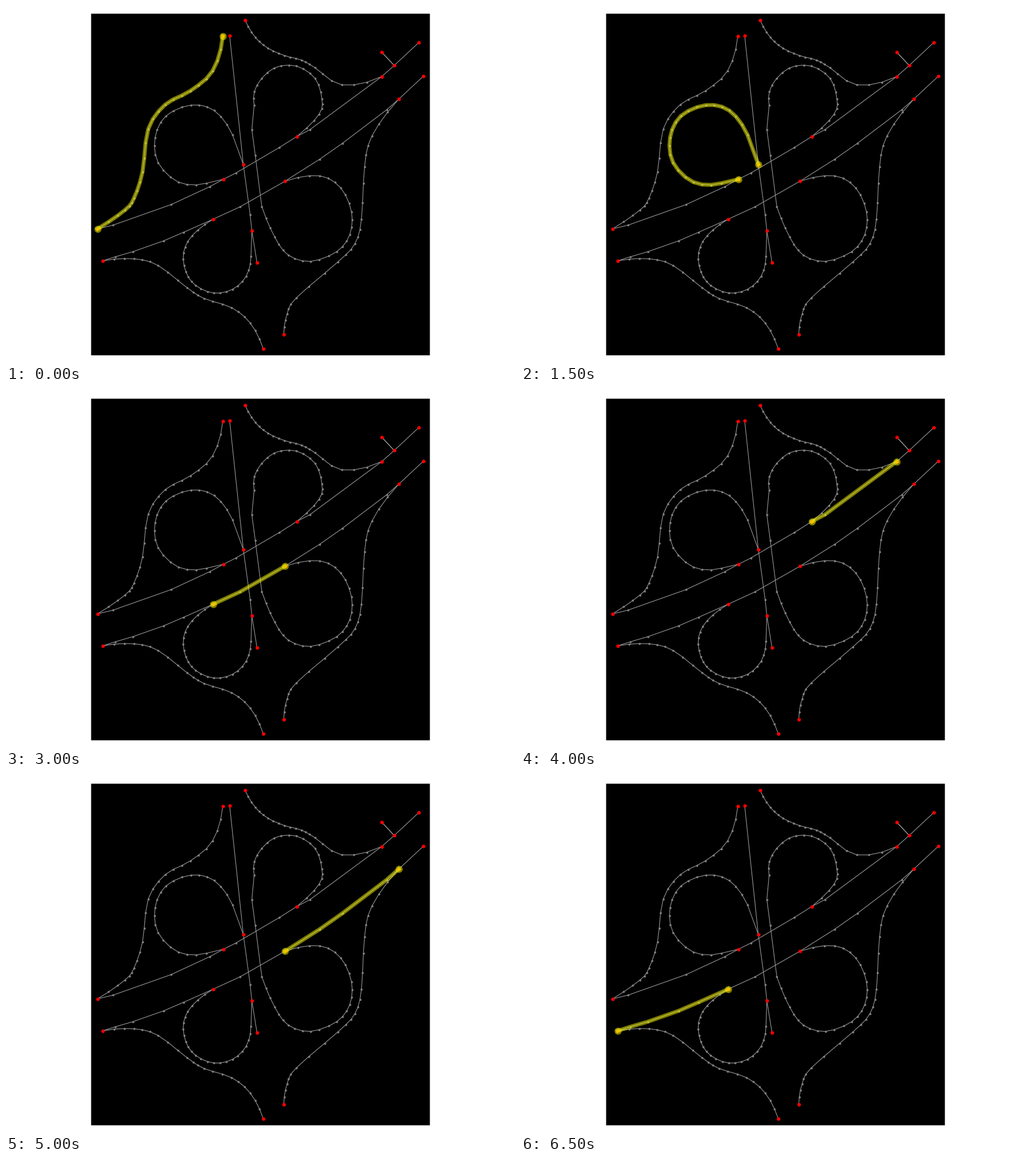
Animation of 894x626 px, one loop 7000 ms. Source, as a matplotlib script:

```python
import matplotlib.pyplot as plt
import numpy as np
from matplotlib.animation import FuncAnimation
from matplotlib.patches import Rectangle

W, H, DPI = 894, 626, 100
STEP = 500
SHIFT = 0.2


def bend(*keys, steps=3):
    """Catmull-Rom curve through keys, with evenly stepped nodes per span."""
    p = np.array(keys, float)
    head = 3 * p[0] - 3 * p[1] + p[2]
    tail = 3 * p[-1] - 3 * p[-2] + p[-3]
    p = np.vstack([head, p, tail])
    nodes = []
    for a, b, c, d in zip(p, p[1:], p[2:], p[3:]):
        for t in np.arange(steps) / steps:
            q = b + t / 2 * (c - a + t * (2 * a - 5 * b + 4 * c - d
                                          + t * (3 * (b - c) + d - a)))
            nodes.append(tuple(q))
    return nodes + [keys[-1]]


# Junctions
WEST_N, WEST_S = (161, 391), (170, 447)
NORTH_A, NORTH_B, NORTH_C = (381, 53), (393, 52), (420, 25)
SOUTH_A, SOUTH_B, SOUTH_C = (441, 450), (452, 601), (488, 576)
MID_N, MID_S = (417, 278), (432, 394)
LOOP_NW, LOOP_NE = (382, 304), (511, 229)
LOOP_SW, LOOP_SE = (364, 374), (490, 307.5)
EAST_N, EAST_S = (660, 124), (690, 163.5)
FORK, SPUR = (682, 104.5), (660, 81)
EXIT_N, EXIT_S = (725, 64.5), (733, 123.5)

# Outer ramps
west_ramp = bend(WEST_N, (209, 358), (225, 337), (240, 291), (250, 216),
                 (280, 173), (324, 149), (363, 114), NORTH_A)
north_ramp = bend(NORTH_C, (438, 55), (460, 74), (489, 87), (519, 95),
                  (543, 108.5), (590, 138.5), EAST_N)
east_ramp = bend(EAST_S, (643, 228), (630, 282), (624.5, 374), (613, 417),
                 (583, 449), (510, 512), (494, 540), SOUTH_C)
south_ramp = bend(WEST_S, (225, 443.5), (267, 455), (318, 494), (348, 513),
                  (396, 529), (429, 556), SOUTH_B)

# Cloverleaf loops
nw_loop = [MID_N, *bend((398, 226), (366, 183.5), (325, 174), (281, 193),
                        (262, 231), (267.5, 275), (303, 309), (352, 311)),
           LOOP_NW]
sw_loop = [*bend(LOOP_SW, (327, 403), (312, 433), (316, 466), (333, 490),
                 (365, 503.5), (398, 497), (422, 474), (430.5, 439)), MID_S]
ne_loop = bend(LOOP_NE, (550, 190), (555, 163), (543, 127), (510, 105.5),
               (471, 109), (441, 139), (436, 174))
se_loop = bend((449.5, 352), (472, 405), (496, 437), (535, 448), (581, 431),
               (604, 401), (607, 361), (588, 319), (551, 298), LOOP_SE)
east_loops = [*ne_loop, (432, 217), (438, 262), *se_loop]

# Main carriageways
north_w = [WEST_N, (188, 384.5), (290, 348.5), (358, 317), LOOP_NW]
north_mid = [LOOP_NW, (404, 293), (480, 248.5), LOOP_NE]
north_e = [LOOP_NE, (534, 217), EAST_N]
south_w = [WEST_S, (192, 440), (223, 431), (277, 412), (312, 397), LOOP_SW]
south_mid = [LOOP_SW, (411, 352.5), LOOP_SE]
south_e = [LOOP_SE, (551, 269), (591, 241), (669, 182), EAST_S]
cross = [MID_N, (429, 366), MID_S]

tour = [west_ramp, sw_loop, north_mid, nw_loop, north_w, east_ramp, south_mid,
        north_ramp, north_e, east_loops, south_e, cross, south_ramp, south_w]
plain = [[NORTH_B, MID_N], [MID_S, SOUTH_A], [EAST_N, FORK], [FORK, EXIT_N],
         [FORK, SPUR], [SPUR, FORK], [EAST_S, EXIT_S]]
roads = tour + plain

fig = plt.figure(figsize=(W / DPI, H / DPI), dpi=DPI, facecolor="white")
ax = fig.add_axes([0, 0, 1, 1])
ax.set_xlim(SHIFT, W + SHIFT)
ax.set_ylim(H + SHIFT, SHIFT)
ax.axis("off")
ax.add_patch(Rectangle((149.7, 13.7), 595, 599, color="black", lw=0,
                       zorder=0, snap=False))


def dots(points, size, color, z, **kw):
    xs, ys = zip(*points)
    return ax.scatter(xs, ys, s=size, c=color, linewidths=0, zorder=z, **kw)


for road in roads:
    ax.plot(*zip(*road), color="#999999", lw=0.8, zorder=1)

dots([p for road in roads for p in road[1:-1]], 7.5, "#808080", 2)
dots(sorted({p for road in roads for p in (road[0], road[-1])}), 20, "red", 3)

glow, = ax.plot([], [], color="yellow", lw=5, alpha=0.5, zorder=5,
                solid_capstyle="projecting", solid_joinstyle="round")
ends = dots([WEST_N, NORTH_A], 80, "yellow", 4, alpha=0.5)


def draw(i):
    road = tour[i % len(tour)]
    glow.set_data(*zip(*road))
    ends.set_offsets([road[0], road[-1]])
    return glow, ends


anim = FuncAnimation(fig, draw, frames=len(tour), interval=STEP,
                     init_func=lambda: draw(0), repeat=True, repeat_delay=0)
plt.show()
```
